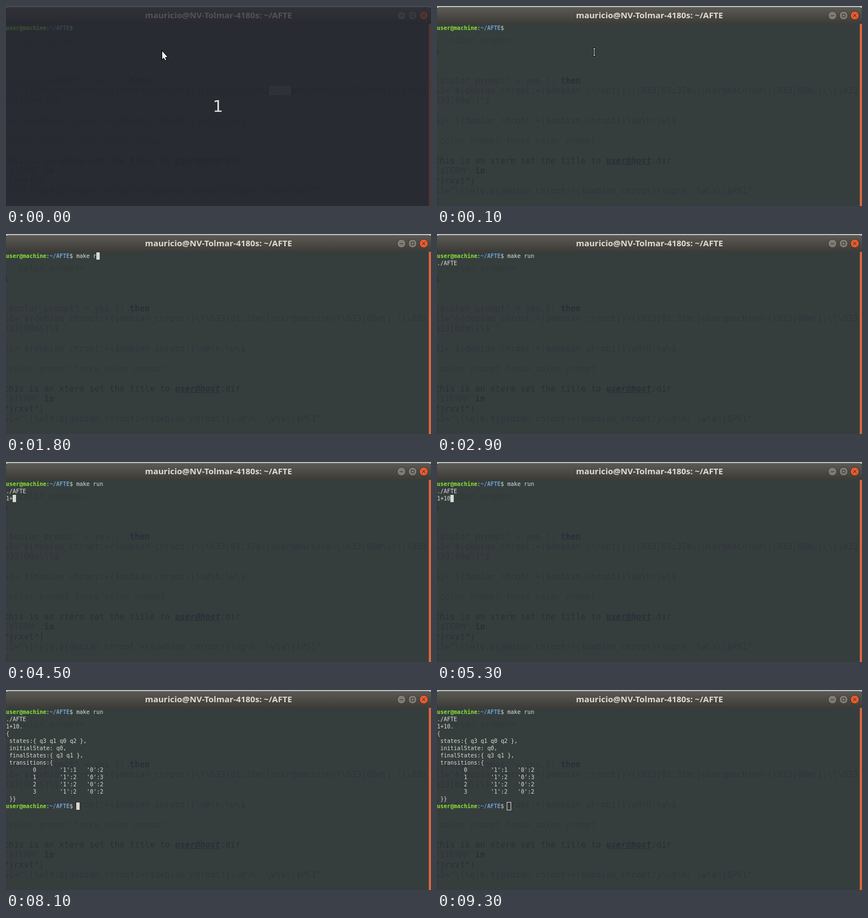
An HTML page with a canvas that plays this animation: 762x359 px, repeating every 9400 ms.

```html
<!DOCTYPE html>
<html lang="en">
<head>
<meta charset="utf-8">
<title>Terminal session</title>
<style>
  html, body { margin: 0; width: 762px; height: 359px; overflow: hidden; background: #363e3d; }
  canvas { display: block; }
</style>
</head>
<body>
<canvas width="762" height="359"></canvas>
<script>
const ctx = document.querySelector('canvas').getContext('2d');
const W = 762, H = 359, LOOP = 9400, COL = 6, ROW = 13, TOP = 33;
const MONO = '"DejaVu Sans Mono", monospace';
const FG = '#d8dbd3', BG = '#363e3d';

// [time, characters typed so far]
const COMMAND = [[500, 1], [700, 2], [900, 3], [1100, 4], [1200, 5], [1800, 6], [2000, 8]];
const INPUT = [[4300, 1], [4500, 2], [5300, 4], [6000, 5]];
const BLINK_OFF = [[0, 400], [2900, 4000], [4900, 5100], [6400, 6900], [7500, 8100], [8700, 9200]];

const OUTPUT = [
  '{',
  ' states:{ q3 q1 q0 q2 },',
  ' initialState: q0,',
  ' finalStates:{ q3 q1 },',
  ' transitions:{',
  ...['12', '23', '22', '22'].map(([a, b], i) => `        ${i}       '1':${i ? 2 : a}   '0':${b}`),
  ' }}'
];

// Window showing through from behind: [line, text, colour, weight]
const DIM = '#303838', PLUM = '#33333d', INK = '#292f38';
const CHROOT = '${debian_chroot:+($debian_chroot)}';
const GHOST = [
  [0, '   color_prompt=', DIM],
  [1, 'i', INK],
  [4, '"$color_prompt" = yes ];', PLUM],
  [4, ' '.repeat(25) + 'then', INK, 'bold '],
  [5, `S1='${CHROOT}\\[\\033[01;32m\\]user@machine\\[\\033[00m\\]:\\[\\033[`, PLUM],
  [6, "033[00m\\]\\$ '", PLUM],
  [8, `S1='${CHROOT}\\u@\\h:\\w\\$ '`, PLUM],
  [10, ' color_prompt force_color_prompt', DIM],
  [12, 'this is an xterm set the title to ' + ' '.repeat(9) + ':dir', INK],
  [12, ' '.repeat(34) + 'user@host', INK, 'italic bold '],
  [13, '"$TERM"', PLUM],
  [13, ' '.repeat(8) + 'in', INK, 'bold '],
  [14, '*|rxvt*)', INK],
  [15, `S1="\\[\\e]0;${CHROOT}\\u@\\h: \\w\\a\\]$PS1"`, PLUM],
  [16, ';', INK]
];

const countAt = (steps, t) => steps.reduce((n, [at, count]) => t >= at ? count : n, 0);

function box(x, y, w, h, color) {
  ctx.fillStyle = color;
  ctx.fillRect(x, y, w, h);
}

function text(str, x, y, color, font, align = 'left') {
  ctx.font = font;
  ctx.textAlign = align;
  ctx.fillStyle = color;
  ctx.fillText(str, x, y);
}

function path(points, fill, stroke, width) {
  ctx.beginPath();
  points.forEach(([x, y]) => ctx.lineTo(x, y));
  ctx.closePath();
  ctx.strokeStyle = stroke;
  ctx.lineWidth = width;
  ctx.stroke();
  ctx.fillStyle = fill;
  ctx.fill();
}

function print(str, col, row, color = FG, weight = '') {
  text(str, col * COL, TOP + row * ROW + 10, color, `${weight}10px ${MONO}`);
}

function prompt(row) {
  print('user@machine', 0, row, '#8ae234', 'bold ');
  print(':', 12, row);
  print('~/AFTE', 13, row, '#729fcf', 'bold ');
  print('$', 19, row);
}

function drawWindow() {
  box(0, 0, W, H, BG);
  for (const [line, str, color, style = ''] of GHOST)
    text(str, -4, 67 + line * 18, color, `${style}15px ${MONO}`);
  box(303, 284, 81, 1, INK);
  box(758, 32, 4, H, '#d9663f');

  box(0, 0, W, 3, '#bfc0bd');
  const shade = ctx.createLinearGradient(0, 2, 0, 32);
  shade.addColorStop(0, '#5b5a54');
  shade.addColorStop(1, '#3c3b37');
  ctx.fillStyle = shade;
  ctx.beginPath();
  ctx.roundRect(0, 2, W, 30, [5, 5, 0, 0]);
  ctx.fill();
  text('mauricio@NV-Tolmar-4180s: ~/AFTE', 381, 22, '#dfdbd2', 'bold 15px "Noto Sans", sans-serif', 'center');

  ['#7d7b73', '#7d7b73', '#ea5b2f'].forEach((color, i) => {
    ctx.beginPath();
    ctx.arc(709 + i * 20, 17, 7.7, 0, 7);
    ctx.fillStyle = color;
    ctx.fill();
    ctx.strokeStyle = '#33322e';
    ctx.lineWidth = 1;
    ctx.stroke();
  });
  ctx.beginPath();
  ctx.moveTo(706, 17.5);
  ctx.lineTo(712, 17.5);
  ctx.rect(726.5, 14.5, 5, 5);
  ctx.moveTo(746, 14);
  ctx.lineTo(752, 20);
  ctx.moveTo(752, 14);
  ctx.lineTo(746, 20);
  ctx.stroke();
}

function drawTerminal(t) {
  const command = 'make run'.slice(0, countAt(COMMAND, t));
  const input = '1+10.'.slice(0, countAt(INPUT, t));
  let col = 21 + command.length, row = 0;
  prompt(0);
  print(command, 21, 0);
  if (t >= 2400) {
    print('./AFTE', 0, 1);
    print(input, 0, 2);
    col = input.length;
    row = 2;
  }
  if (t >= 7000) {
    OUTPUT.forEach((line, i) => print(line, 0, 3 + i));
    prompt(13);
    col = 21;
    row = 13;
  }
  const x = col * COL, y = TOP + row * ROW;
  if (t >= 9300) {
    ctx.strokeStyle = FG;
    ctx.lineWidth = 1;
    ctx.strokeRect(x - 0.5, y - 0.5, COL + 1, ROW + 1);
  } else if (!BLINK_OFF.some(([from, to]) => t >= from && t < to)) {
    box(x, y, COL, ROW, FG);
  }
}

function drawCountdown() {
  box(0, 0, W, H, 'rgba(35, 37, 47, 0.75)');
  box(471, 143, 40, 17, 'rgba(255, 255, 255, 0.03)');
  text('1', 380, 190, '#deded9', '29px "DejaVu Sans", sans-serif', 'center');
  path([[280, 81], [280, 95.5], [283, 92.8], [285.3, 97.5], [287.3, 96.5], [285, 92], [289.5, 91.5]],
    '#f0f0f0', '#000', 2);
}

function drawIBeam() {
  box(279, 75, 6, 3, '#101414');
  box(279, 87, 6, 3, '#101414');
  box(280.5, 76, 3, 13, '#101414');
  box(280, 76, 4, 1, '#eee');
  box(280, 88, 4, 1, '#eee');
  box(281.5, 76, 1, 13, '#eee');
}

const start = performance.now();
function frame() {
  const t = (performance.now() - start) % LOOP;
  drawWindow();
  drawTerminal(t);
  if (t < 100) drawCountdown();
  else if (t < 400) drawIBeam();
  requestAnimationFrame(frame);
}
frame();
</script>
</body>
</html>
```
